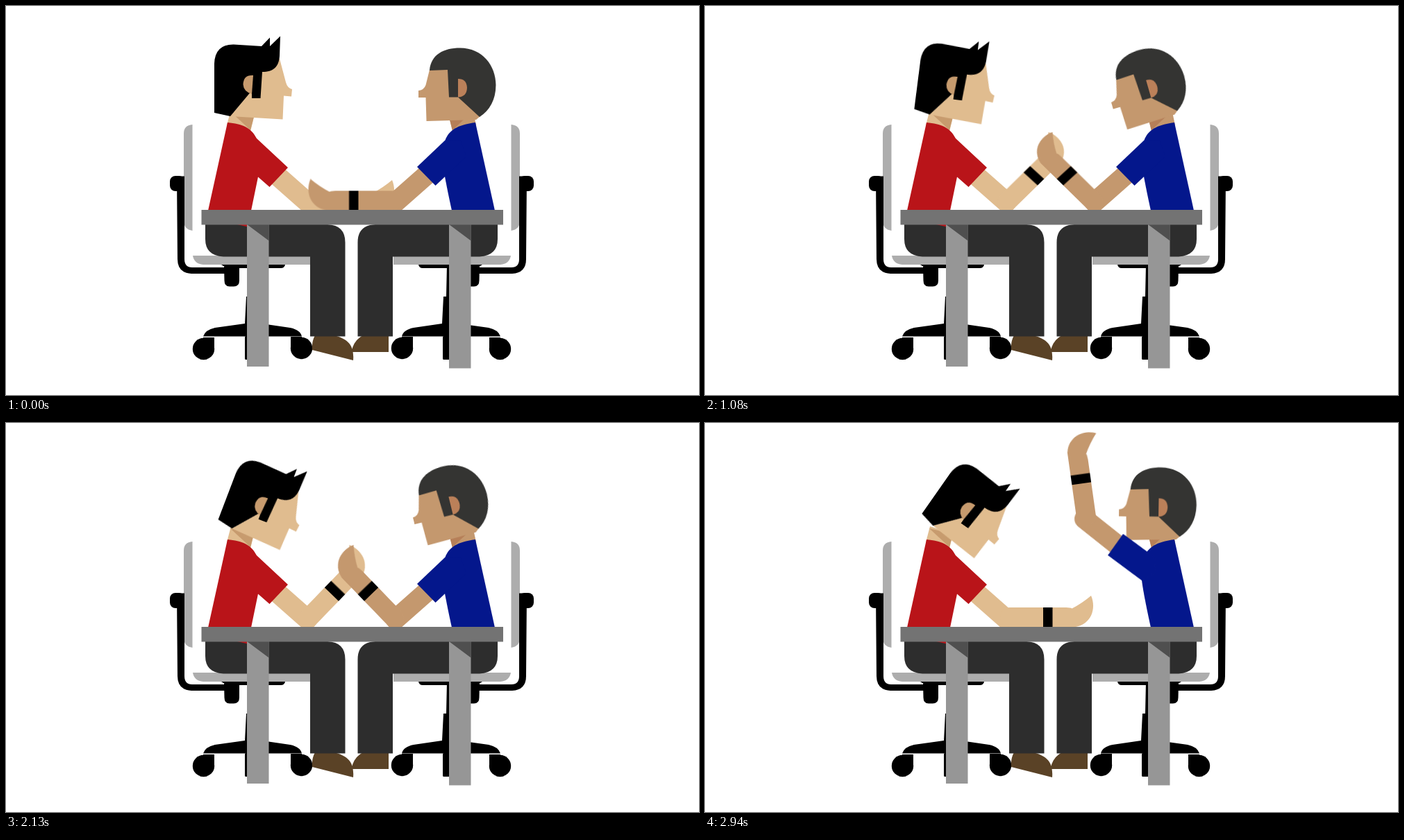
Animation, 998 px wide and 561 px high, one loop 3 s. Source, as an HTML page without scripts:

```html
<!DOCTYPE html>
<html lang="en">
<head>
<meta charset="utf-8">
<title>Arm wrestling</title>
<style>
html, body { margin: 0; width: 100%; height: 100%; overflow: hidden; background: #fff; }
svg { display: block; width: 100vw; height: 100vh; }

.tan { fill: #e0bc8f; }
.brown { fill: #c4986e; }
.grey { fill: #adadad; }
.pants { fill: #2d2d2d; }
.shoe { fill: #5a4226; }
.red { fill: #b91419; }
.blue { fill: #04178c; }
.hair { fill: #343432; }
.leg { fill: #969696; }
.shade { fill: #4f4f4f; }
.upper { fill: none; stroke-width: 29; stroke-linecap: round; }

.move { animation: 3s ease-in-out infinite; }
#redHead { transform-origin: 343px 162px; animation-name: redHead; }
#blueHead { transform-origin: 650px 162.5px; animation-name: blueHead; }
#redFore { animation-name: redFore; }
#blueFore { animation-name: blueFore; }
#blueArm { transform-origin: 640px 202px; animation-name: swing; }
.press { transform-origin: 498px 294px; animation-name: press; }

@keyframes redHead {
  0%, 8% { transform: rotate(0deg); }
  18.5% { transform: rotate(7deg); animation-timing-function: ease-out; }
  25% { transform: rotate(14.6deg); }
  28% { transform: rotate(16deg); }
  38% { transform: rotate(6.5deg); }
  47% { transform: rotate(16.3deg); }
  55% { transform: rotate(10.5deg); }
  62% { transform: rotate(19deg); animation-timing-function: linear; }
  72% { transform: rotate(21deg); }
  80% { transform: rotate(31.3deg); animation-timing-function: ease-out; }
  88%, 100% { transform: rotate(35deg); }
}
@keyframes blueHead {
  0% { transform: rotate(0deg); animation-timing-function: linear; }
  8% { transform: rotate(-7.7deg); animation-timing-function: linear; }
  18.5% { transform: rotate(-15deg); animation-timing-function: ease-out; }
  25% { transform: rotate(-20deg); }
  28% { transform: rotate(-21.5deg); }
  38% { transform: rotate(-15.5deg); }
  47% { transform: rotate(-22.5deg); }
  62% { transform: rotate(-15.7deg); animation-timing-function: linear; }
  80% { transform: rotate(-11.6deg); }
  90% { transform: translate(1.5px, 3.5px) rotate(17deg); }
  98%, 100% { transform: translate(1.5px, 3.5px) rotate(1deg); }
}
@keyframes redFore {
  0% { transform: translate(439px, 284px) rotate(0deg); }
  8% { transform: translate(439px, 282px) rotate(-39deg); }
  18%, 72% { transform: translate(437px, 283px) rotate(-46deg); animation-timing-function: ease-in; }
  79%, 100% { transform: translate(439px, 282px) rotate(0deg); }
}
@keyframes blueFore {
  0% { transform: translate(555.5px, 282.5px) rotate(0deg); }
  8% { transform: translate(557px, 282px) rotate(2.5deg); }
  18%, 72% { transform: translate(558px, 283px) rotate(46deg); animation-timing-function: ease-in; }
  79%, 80% { transform: translate(548px, 282px) rotate(0deg); }
  89%, 100% { transform: translate(558px, 282px) rotate(2deg); }
}
@keyframes swing {
  0%, 80% { transform: rotate(0deg); }
  89.5%, 100% { transform: rotate(80deg); }
}
@keyframes press {
  0%, 25% { transform: scaleY(1); }
  37% { transform: scaleY(.95); }
  47% { transform: scaleY(.83); }
  56% { transform: scaleY(1); }
  62% { transform: scaleY(1.01); }
  72%, 100% { transform: scaleY(1); }
}
</style>
</head>
<body>
<svg viewBox="0 0 998 561">
<defs>
  <g id="chair">
    <path class="grey" d="M268.500 171V324Q256 322 256 310V184Q256 172 268.500 171ZM269 360H438V373H284Q271 372 269 360Z"/>
    <rect x="236" y="245" width="21" height="22" rx="8"/>
    <path d="M246 245.500H257V365Q257 377 268 377H318V386H267Q247 385 247 365Z"/>
    <path d="M310 373H402Q401 378 396 378H318ZM314 376H336V396Q336 404.500 328 404.500H322Q314.500 404.500 314.500 396Z"/>
    <path d="M350 373H361L362 419H366L368 458L409 464Q424 467 426 476.500H284Q287 467 301 464L344 458L346 419H350Z"/>
    <rect x="344" y="476" width="23" height="34" rx="1.500"/>
    <circle cx="284.500" cy="494.500" r="15.700"/>
    <circle cx="425.500" cy="493.500" r="15.700"/>
    <path d="M284 478H300V494H284ZM410 477H426V494H410Z"/>
  </g>
  <path id="trousers" class="pants" d="M287 315H463Q488.500 316 488.500 341V476.500H438V361.500H313Q287 360 287 336Z"/>
  <g id="fore">
    <path d="M0 -16H81Q87 -16 89.500 -14.500Q104 -22 117 -33C125 -14 117 8 95 12H0A14 14 0 0 1 0 -16Z"/>
    <path fill="#000" d="M48 -16H61.500V12H48Z"/>
  </g>
</defs>

<use href="#chair"/>
<use href="#chair" transform="matrix(-1 0 0 1 996 0)"/>
<path class="shoe" d="M445 475H473C490 480 502 487 500 511L441 496Q440 484 445 475ZM514 475H551V499H497.500Q500 483 514 475Z"/>
<use href="#trousers"/>
<use href="#trousers" transform="matrix(-1 0 0 1 995 0)"/>

<!-- Necks and heads -->
<path class="tan" d="M324 149L357 160L352 181L318 172Z"/>
<path fill="#c79b6e" d="M323 152L357 160L352 179Z"/>
<g id="redHead" class="move">
  <path class="tan" d="M323 159L398.500 163.500L400 129.500L411 130.500L412 120Q405 118 403 110L394 76L350 85V126Z"/>
  <path d="M300 154V83Q301 55 328 55.500L368 58L380 45.500V58L395 43.500L394 72C393 88 385 95 369 95L366.500 133H354L354 122L323 159Z"/>
  <path fill="#c79b6e" d="M356 100Q342 99 341.500 113Q342 123 354 127Z"/>
</g>
<path class="brown" d="M672 148L638 160L643 181L677 172Z"/>
<path fill="#b67f58" d="M672 152L638 160L643 179Z"/>
<g id="blueHead" class="move">
  <path class="brown" d="M610 92L604.500 114Q602 121 594 122V132H604.500L605.500 166L677 164L683 159L651 129V88Z"/>
  <path class="hair" d="M610 93C612 70 630 60.500 654 60.500C686 60.500 705.500 86 705.500 114Q705 145 682 160L651 131.500H638L636 92Z"/>
  <path fill="#bb8059" d="M651 105Q663.500 105 664 118Q663.500 131 651 131.500Z"/>
</g>

<!-- Red player -->
<path class="upper" stroke="#e0bc8f" d="M391 245L434 283"/>
<g class="move press"><g id="redFore" class="move tan"><use href="#fore"/></g></g>
<path class="red" d="M319 168C340 170 353 175 361 191L406 233L379.500 261L363 246.500L353 295H291Z"/>

<!-- Blue player -->
<path class="blue" d="M676 168C655 171 640 176 633 192L628.500 222Q630 240 642 295H704Z"/>
<g id="blueArm" class="move">
  <path class="upper" stroke="#c4986e" d="M604 245L561 283"/>
  <g class="move press"><g id="blueFore" class="move brown"><use href="#fore" transform="scale(-1 1)"/></g></g>
  <path class="blue" d="M592 232L633 193L655 195L663 217L618.500 259Z"/>
</g>

<!-- Table -->
<path class="red" d="M333 315H348V318.500Z"/>
<path class="leg" d="M347 315H378.500V520H347ZM638 315H669.500V522.500H638Z"/>
<path class="shade" d="M347 315H378.500V338.500ZM638 315H669.500V338.500Z"/>
<rect x="281.500" y="294" width="434.500" height="21.500" fill="#737373"/>
</svg>
</body>
</html>
```
